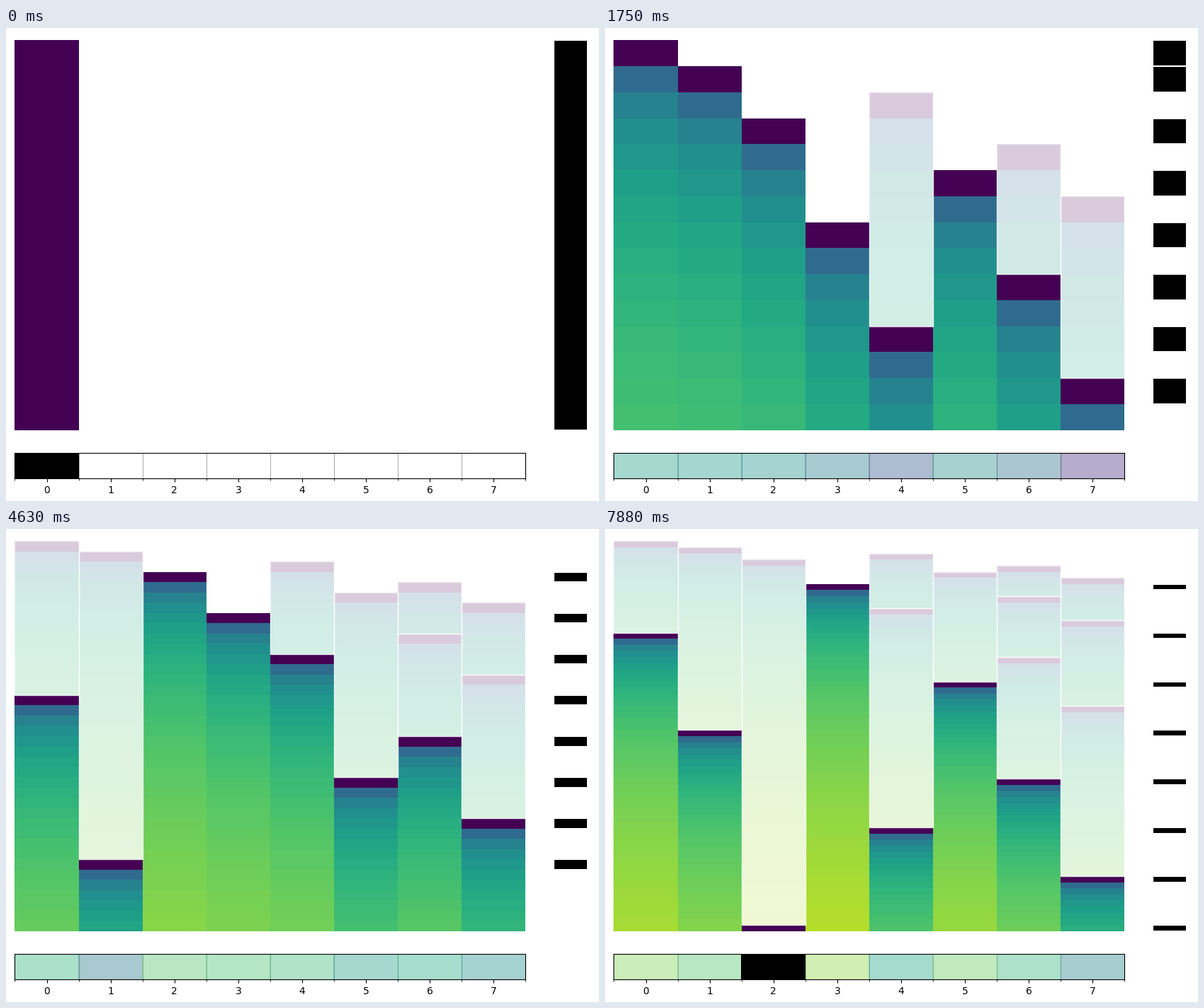
A matplotlib script that plays this animation: 837 by 669 pixels, repeating every 8 s.

```python
import numpy as np
import matplotlib.pyplot as plt
from matplotlib.animation import FuncAnimation
from matplotlib.colors import LogNorm, SymLogNorm
from matplotlib.patches import Rectangle

W, H, DPI = 837, 669, 100
STEPS = 64
MAX_AGE = 128

# Time steps at which each slot is overwritten.
WRITES = [
    [0, 15], [1, 31], [3, 63], [7],
    [2, 11, 47], [5, 23], [4, 9, 19, 39], [6, 13, 27, 55],
]
SLOTS = len(WRITES)

cmap = plt.get_cmap("viridis")
cell_norm = SymLogNorm(1, linscale=1, vmin=0, vmax=MAX_AGE, base=10)
slot_norm = LogNorm(1, MAX_AGE)


def age_table():
    ages = np.full((STEPS, SLOTS), -1)
    for slot, times in enumerate(WRITES):
        for t in times:
            ages[t:, slot] = np.arange(STEPS - t)
    return np.ma.masked_less(ages, 0)


AGES = age_table()

plt.rcParams["font.family"] = "DejaVu Sans"
# The tiny margin keeps the pixel size from rounding down.
fig = plt.figure(figsize=((W + 1e-4) / DPI, (H + 1e-4) / DPI), dpi=DPI,
                 facecolor="white")


def pixel_axes(left, top, right, bottom):
    return fig.add_axes([left / W, 1 - bottom / H,
                         (right - left) / W, (bottom - top) / H])


LEFT, RIGHT, TOP, BOTTOM = 12.45, 733.3, 17.45, 568.55
history = pixel_axes(LEFT, TOP, RIGHT, BOTTOM)
kept = pixel_axes(773, TOP, 821, BOTTOM)
current = pixel_axes(LEFT, 600.6, RIGHT, 637.3)

current.set_xlim(-0.5, SLOTS - 0.5)
current.set_ylim(0, 1)
current.set_yticks([])
current.set_xticks(range(SLOTS))
current.set_xticks(np.arange(SLOTS + 1) - 0.5, minor=True)
current.set_axisbelow(True)
current.grid(which="minor", axis="x")

# Neighbouring cells share one pixel column on the divider.
PAD = 0.5 * SLOTS / (RIGHT - LEFT)
cells = [
    current.add_patch(Rectangle((s - 0.5 - PAD, 0), 1 + 2 * PAD, 1, lw=0))
    for s in range(SLOTS)
]


def reset(ax, width, rows):
    ax.clear()
    ax.axis("off")
    ax.set_xlim(0, width)
    ax.set_ylim(rows, 0)


def draw_history(t):
    rows = t + 1
    reset(history, SLOTS, rows)
    history.pcolormesh(np.arange(SLOTS + 1), np.arange(rows + 1), AGES[:rows],
                       cmap=cmap, norm=cell_norm)
    history.set_ylim(rows, 0)
    reset(kept, 1, rows)
    for slot, times in enumerate(WRITES):
        past = [w for w in times if w <= t]
        for start, end in zip(past, past[1:]):
            history.add_patch(Rectangle((slot, start), 1, end - start,
                                        fc="white", ec="white",
                                        lw=1, alpha=0.8))
        if past:
            kept.add_patch(Rectangle((0, past[-1]), 1, 1,
                                     fc="black", ec="white", lw=1.5))


def draw_current(t):
    for slot, cell in enumerate(cells):
        age = AGES[t, slot]
        cell.set_visible(age is not np.ma.masked)
        if age is np.ma.masked:
            continue
        fresh = age == 0
        color = (0, 0, 0, 1) if fresh else cmap(slot_norm(age + 1), alpha=0.4)
        cell.set_facecolor(color)
        cell.set_zorder(2 if fresh else 1)


def update(t):
    draw_history(t)
    draw_current(t)
    return []


anim = FuncAnimation(fig, update, frames=STEPS, interval=8000 / STEPS,
                     init_func=lambda: update(0), repeat=True, repeat_delay=0)
plt.show()
```
